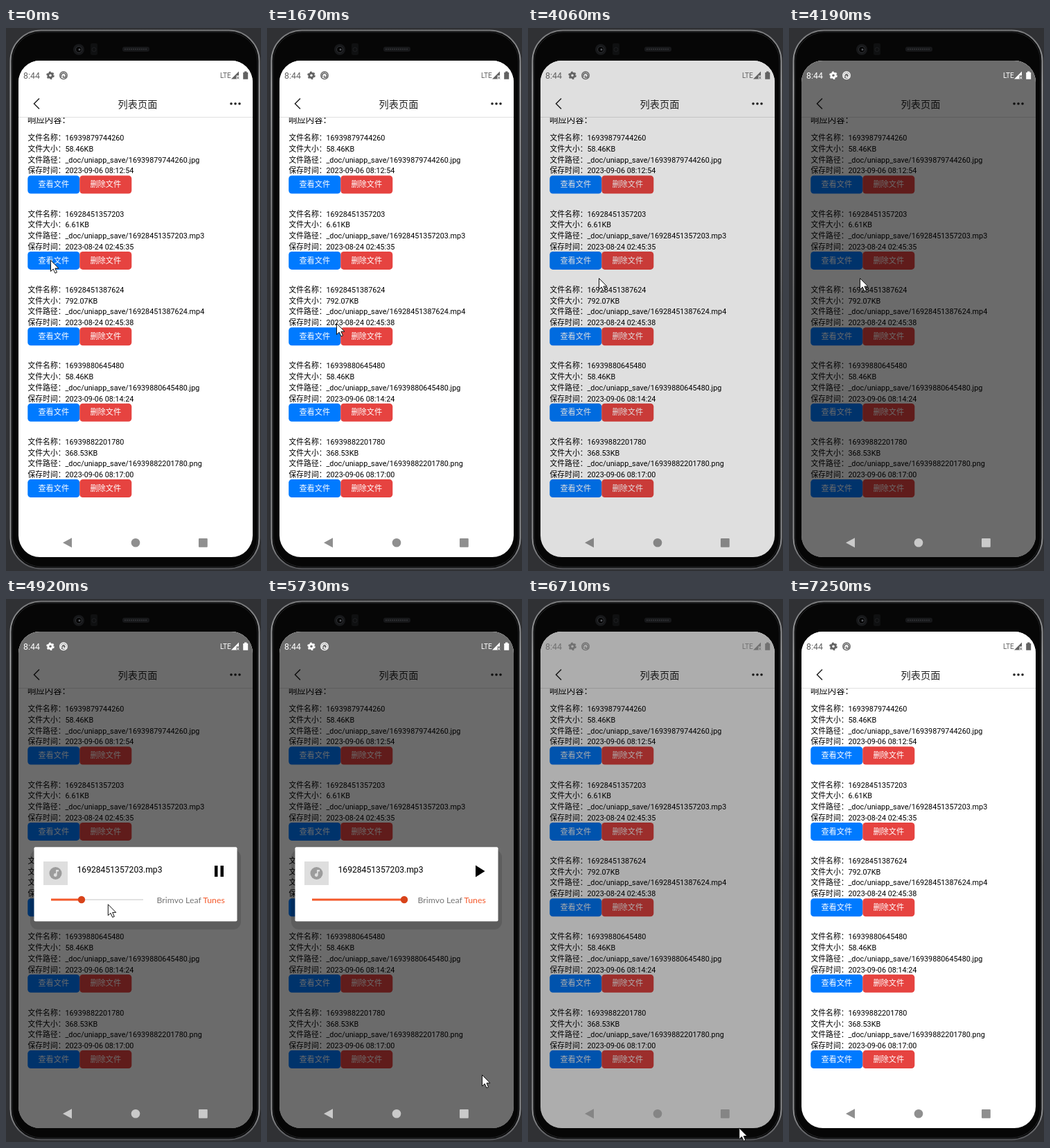
Recreate the animation shown at these times as an HTML page. Size 368 px wide and 782 px high, loop 7.59 s.

```html
<!DOCTYPE html>
<html lang="zh-CN">
<meta charset="utf-8">
<title>列表页面</title>
<style>
html, body { margin: 0; height: 100%; overflow: hidden; background: #303134 }
svg { display: block }
text { font-family: Roboto, "Noto Sans CJK SC", "Noto Sans CJK", sans-serif; font-size: 10.8px }
.btn { font-size: 11.2px; fill: #fff; text-anchor: middle }
</style>
<svg width="368" height="782" viewBox="0 0 368 782">
  <defs>
    <clipPath id="glass"><rect x="18" y="47" width="338" height="715" rx="31"/></clipPath>
    <linearGradient id="metal" x2="0" y2="1">
      <stop stop-color="#77787a"/><stop offset=".1" stop-color="#a2a3a5"/>
      <stop offset=".5" stop-color="#6d6e70"/><stop offset=".95" stop-color="#8d8e90"/>
      <stop offset="1" stop-color="#55565a"/>
    </linearGradient>
  </defs>

  <!-- phone body -->
  <rect width="368" height="782" fill="#303134"/>
  <rect x="6.5" y="3.5" width="359" height="775" rx="44" fill="#060606" stroke="url(#metal)" stroke-width="2"/>
  <rect x="9" y="6" width="354" height="770" rx="42" fill="none" stroke="#232426"/>
  <circle cx="105" cy="31" r="8" fill="#17181a"/>
  <circle cx="105" cy="31" r="4.5" fill="#050505" stroke="#303236"/>
  <circle cx="106" cy="31" r="1.5" fill="#55585e"/>
  <rect x="122" y="22" width="10" height="17" rx="2" fill="#0f1011"/>
  <circle cx="127" cy="31" r="3" fill="none" stroke="#1d1e20"/>
  <rect x="168" y="27" width="39" height="7" rx="3" fill="#17181a"/>
  <path d="M171 30.500h33" stroke="#35363a" stroke-width="1.500" stroke-dasharray="2 1"/>

  <g clip-path="url(#glass)">
    <rect x="18" y="47" width="338" height="715" fill="#fff"/>
    <text x="31" y="137" style="font-size:12.4px">响应内容：</text>
    <g id="list"></g>
    <rect x="18" y="47" width="338" height="81" fill="#fff"/>
    <path d="M18 128.500h338" stroke="#e0e0e0"/>
    <path d="M48 101.500l-7.500 7.500 7.500 7.500" fill="none" stroke="#222" stroke-width="1.500"/>
    <text x="190" y="115" text-anchor="middle" fill="#222" style="font-size:14.2px">列表页面</text>
    <g fill="#222"><circle cx="325" cy="109" r="1.800"/><circle cx="331" cy="109" r="1.800"/><circle cx="337" cy="109" r="1.800"/></g>
    <rect id="dim" x="18" y="47" width="338" height="715"/>

    <g id="status">
      <text x="25" y="73" style="font-size:12.4px">8:44</text>
      <circle cx="64" cy="68.300" r="3.200" fill="none" stroke="currentColor" stroke-width="2.800"/>
      <circle cx="64" cy="68.300" r="5" fill="none" stroke="currentColor" stroke-width="1.600" stroke-dasharray="2.618"/>
      <circle cx="83" cy="68.300" r="5.300" fill="none" stroke="currentColor" stroke-width="1.300"/>
      <path d="M80 70.500a3.500 3.500 0 1 1 5.500 .5h-3v-2.500" fill="none" stroke="currentColor" stroke-width="1.400"/>
      <text x="309" y="72.300" style="font-size:10px">LTE</text>
      <path d="M325 73.500l11-11v6h-3.500v5z"/>
      <path d="M333.300 70l2.800 3.500m0-3.500l-2.800 3.500" stroke="currentColor"/>
      <path d="M344 62.500h3.500v1.500h1.700v9.800h-7V64h1.800z"/>
    </g>
    <g id="nav">
      <path d="M82 741.300l13-7v14z"/>
      <circle cx="187" cy="741.300" r="6.300"/>
      <rect x="278" y="735" width="12.800" height="12.800" rx="1"/>
    </g>

    <g id="player">
      <rect x="35" y="361" width="304" height="115" rx="11" opacity=".13"/>
      <rect x="40.500" y="357.300" width="293" height="107" rx="2" fill="#fff"/>
      <rect x="54" y="378" width="35" height="34" fill="#dedede"/>
      <circle cx="71.500" cy="395" r="9" fill="#9c9c9c"/>
      <path d="M72 390h4v2.500h-2.300v5a2.400 2.400 0 1 1-1.700-2.300z" fill="#dedede"/>
      <text x="102.500" y="394" style="font-size:12.15px">16928451357203.mp3</text>
      <path id="toggle"/>
      <path d="M65 433h133" stroke="#c4c4c4"/>
      <path id="track" stroke="#f4592b" stroke-width="3.200"/>
      <circle id="thumb" cy="433" r="5.200" fill="#d8431a"/>
      <text x="217.500" y="437.500" fill="#757575" style="font:12.3px Lato,sans-serif">Brimvo Leaf <tspan fill="#f4592b">Tunes</tspan></text>
    </g>
  </g>
  <path id="cursor" d="M.5 .5v16l3.700-3.400 2.700 6 2.600-1.100-2.600-5.900h5z" fill="#fff" stroke="#111" stroke-width="1"/>
</svg>
<script>
const LOOP = 7590, PITCH = 109.4, DIM = .58;
const $ = id => document.getElementById(id);
const clamp = x => Math.max(0, Math.min(1, x));
const ramp = (t, a, b) => clamp((t - a) / (b - a));
const set = (id, attrs) => { for (const k in attrs) $(id).setAttribute(k, attrs[k]); };

const files = [
  ['16939879744260', '58.46KB', 'jpg', '2023-09-06 08:12:54'],
  ['16928451357203', '6.61KB', 'mp3', '2023-08-24 02:45:35'],
  ['16928451387624', '792.07KB', 'mp4', '2023-08-24 02:45:38'],
  ['16939880645480', '58.46KB', 'jpg', '2023-09-06 08:14:24'],
  ['16939882201780', '368.53KB', 'png', '2023-09-06 08:17:00']
];
const button = (x, color, label, id) =>
  `<rect id="${id}" x="${x}" y="212.5" width="75" height="26" rx="4.5" fill="${color}"/>
   <text class="btn" x="${x + 37.5}" y="229.3">${label}</text>`;

$('list').innerHTML = files.map(([name, size, ext, date], i) => {
  const lines = ['文件名称：' + name, '文件大小：' + size,
    `文件路径：_doc/uniapp_save/${name}.${ext}`, '保存时间：' + date];
  return `<g transform="translate(0 ${i * PITCH})">` +
    lines.map((s, j) => `<text x="31.500" y="${162.3 + j * 15.7}">${s}</text>`).join('') +
    button(31.3, '#007aff', '查看文件', 'view' + i) +
    button(106.3, '#e64340', '删除文件', 'del' + i) + '</g>';
}).join('');

// time, x, y of the pointer tip
const route = [
  [0, 64, 334], [280, 64, 334], [790, 83, 363], [1160, 83, 363], [1670, 100, 425],
  [3170, 100, 425], [3560, 102, 360], [4770, 102, 360], [5010, 167, 475], [5160, 167, 475],
  [5560, 290, 750], [5730, 310, 685], [5880, 314, 550], [5940, 314, 550], [6180, 286, 527],
  [6490, 286, 527], [6610, 303, 760], [7220, 321, 779], [LOOP, 321, 779]
];
function pointer(t) {
  const i = route.findIndex(p => p[0] > t);
  const [t0, x0, y0] = route[i - 1], [t1, x1, y1] = route[i];
  const p = ramp(t, t0, t1), e = p * p * (3 - 2 * p);
  return [x0 + (x1 - x0) * e, y0 + (y1 - y0) * e];
}

function draw(t) {
  const [x, y] = pointer(t);
  set('cursor', { transform: `translate(${x} ${y})`, visibility: t < 7250 ? 'visible' : 'hidden' });
  set('view1', { fill: t >= 1160 && t < 1320 ? '#0062cc' : '#007aff' });

  const dim = t < 4060 ? 0 : DIM * (ramp(t, 4026, 4190) - ramp(t, 6600, 6850));
  set('dim', { opacity: dim });
  const light = ramp(t, 4080, 4180) - ramp(t, 6530, 6730);
  const grey = Math.round(98 + 157 * light), tint = `rgb(${grey},${grey},${grey})`;
  set('status', { fill: tint, color: tint });
  set('nav', { fill: t >= 4120 && t < 6700 ? '#cacaca' : dim ? '#858585' : '#8f8f8f' });

  // slides up while fading in, then drops away
  const rise = (1 - ramp(t, 4265, 4615)) ** 5, drop = ramp(t, 6365, 6615) ** 4;
  set('player', {
    transform: `translate(0 ${57 * (t < 5000 ? rise : drop)})`,
    opacity: t < 4350 ? 0 : ramp(t, 4265, 4465) - ramp(t, 6615, 6690)
  });
  const knob = t < 4770 ? 66 : t < 5240 ? 109 : t < 5680 ? 153.5 : 198;
  set('thumb', { cx: knob });
  set('track', { d: `M65 433H${knob}` });
  set('toggle', { d: t < 5680 ? 'M301 384h4.500v16h-4.500zM309.500 384h4.500v16h-4.500z' : 'M301 383.500l13.500 8.500-13.500 8.500z' });
}

const start = performance.now();
function tick() {
  draw((performance.now() - start) % LOOP);
  requestAnimationFrame(tick);
}
tick();
</script>
</html>
```
